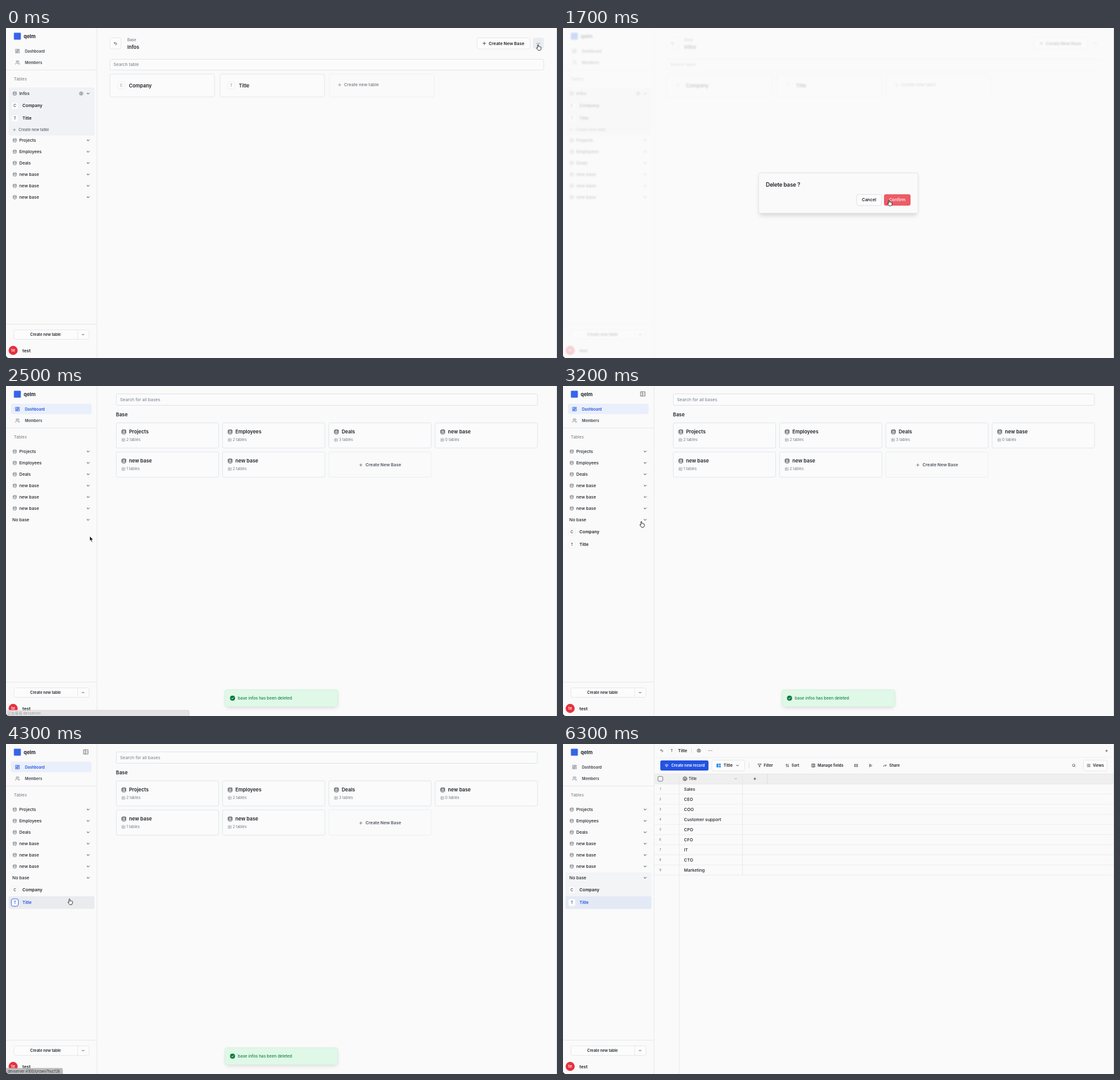
Recreate the animation shown at these times as an HTML page. Size 872 px wide and 522 px high, loop 6400 ms.

```html
<!DOCTYPE html>
<html lang="en">
<head>
<meta charset="utf-8">
<title>Deleting a base</title>
<style>
  html, body { margin: 0; width: 100%; height: 100%; overflow: hidden; background: #fafafa; }
  svg { display: block; width: 872px; height: 522px; font-family: Inter, "Noto Sans CJK SC", "Noto Sans CJK", sans-serif; }
  text { white-space: pre; }
</style>
</head>
<body>
<svg id="stage" viewBox="0 0 872 522"></svg>
<script>
const LOOP = 6400, STEP = 100;
const INK = '#20232a', MUTED = '#737984', PALE = '#a0a5ad', LINE = '#e3e5e8', BLUE = '#2452e0', RED = '#e5404b';
const SMALL = 5.95, BODY = 6.8, TITLE = 7.8;
const BRAND = 'qelm', HOST = 'devserver';

// Icon outlines on a 24 unit grid
const ICONS = {
  base: 'M3 5a9 3 0 0 1 18 0a9 3 0 0 1-18 0V19a9 3 0 0 0 18 0V5M3 12a9 3 0 0 0 18 0',
  down: 'M6 9l6 6 6-6',
  plus: 'M4 12h16M12 4v16',
  users: 'M16 21v-2a4 4 0 0 0-4-4H6a4 4 0 0 0-4 4v2M13 7a4 4 0 1 1-8 0 4 4 0 0 1 8 0M22 21v-2a4 4 0 0 0-3-3.9M16 3.1a4 4 0 0 1 0 7.8',
  dashboard: 'M3 3h7v9H3zM14 3h7v5h-7zM14 12h7v9h-7zM3 16h7v5H3z',
  back: 'M9 14L4 9l5-5M4 9h10.5a5.5 5.5 0 0 1 0 11H12',
  dots: 'M4 12h.1M12 12h.1M20 12h.1',
  gear: 'M12 3l3 2 4 0 1 4 2 3-2 3-1 4-4 0-3 2-3-2-4 0-1-4-2-3 2-3 1-4 4 0zM15 12a3 3 0 1 1-6 0 3 3 0 0 1 6 0',
  trash: 'M3 6h18M19 6v15H5V6M8 6V2h8v4M10 11v6M14 11v6',
  file: 'M5 10V2h9l6 6v14h-8M14 2v6h6M2 17h8M7 14l3 3-3 3',
  filter: 'M22 3H2l8 9.5V19l4 2v-8.5z',
  sort: 'M21 16l-4 4-4-4M17 20V4M3 8l4-4 4 4M7 4v16',
  columns: 'M3 3h18v18H3zM9 3v18M15 3v18',
  rows: 'M3 5h5v4H3zM3 15h5v4H3zM13 5h8M13 9h8M13 15h8M13 19h8',
  play: 'M5 3v18M10 7h5l5 5-5 5h-5z',
  share: 'M15 17l5-5-5-5M4 18v-2a4 4 0 0 1 4-4h12',
  search: 'M19 11a8 8 0 1 1-16 0 8 8 0 0 1 16 0M21 21l-4.3-4.3',
  menu: 'M3 5h18M3 12h18M3 19h18',
  panel: 'M3 3h18v18H3zM9 3v18M16 9l-3 3 3 3',
  table: 'M3 3h18v18H3zM3 9h18M9 3v18M3 15h18',
  record: 'M2 9q10-9 20 0M6 13q6-5 12 0M10 17l2 3 2-3z',
  type: 'M22 12a10 10 0 1 1-20 0 10 10 0 0 1 20 0M12 6v12M8 12l4 5 4-5'
};

const clamp = v => Math.max(0, Math.min(1, v));
const ramp = (t, from, to) => clamp((t - from) / (to - from));
const during = (t, from, to) => t >= from && t < to;

const text = (x, y, s, size = BODY, weight = 500, fill = INK, extra = '') =>
  `<text x="${x}" y="${y + size * .36}" font-size="${size}" font-weight="${weight}" fill="${fill}" ${extra}>${s}</text>`;
const centred = (x, y, s, size, weight, fill) => text(x, y, s, size, weight, fill, 'text-anchor="middle"');
const rect = (x, y, w, h, fill, stroke = 'none', r = 0, extra = '') =>
  `<rect x="${x}" y="${y}" width="${w}" height="${h}" rx="${r}" fill="${fill}" stroke="${stroke}" stroke-width=".8" ${extra}/>`;
const icon = (name, x, y, size = 7, color = INK, width = 2.4) =>
  `<path d="${ICONS[name]}" transform="translate(${x - size / 2} ${y - size / 2}) scale(${size / 24})"
    fill="none" stroke="${color}" stroke-width="${width}" stroke-linecap="round" stroke-linejoin="round"/>`;
const hLine = (x1, x2, y, c = LINE) => rect(x1, y, x2 - x1, .8, c);
const vLine = (x, y1, y2, c = LINE) => rect(x, y1, .8, y2 - y1, c);
const shadow = (x, y, w, h, r = 4) => rect(x, y, w, h, '#00000022', 'none', r, 'style="filter:blur(3px)"');
const group = (body, style = '') => `<g style="${style}">${body}</g>`;

const badge = (x, y, letter, color = '#4b505a', stroke = '#eceef0') =>
  rect(x - 5.6, y - 5.8, 11.2, 11.6, '#fcfcfc', stroke, 3) + centred(x, y, letter, 5.6, 600, color);

const baseRow = (name, y) =>
  icon('base', 13.8, y, 6.6, '#5d626b') + text(21, y, name) + icon('down', 130, y, 7, INK, 3);

function tableRow(name, y, { hover = false, active = false } = {}) {
  const lit = hover || active;
  const fill = active ? '#e3e9f5' : '#e9ebef';
  return (lit ? rect(4, y - 10, 136, 20, fill, 'none', 2) : '') +
    badge(14, y, name[0], lit ? BLUE : undefined, hover ? BLUE : undefined) +
    text(26, y, name, BODY, 600, lit ? BLUE : INK);
}

function sidebar(t) {
  const home = during(t, 2200, 4500), inTable = t >= 4500, deleted = t >= 2200;
  const nav = home ? BLUE : '#3c414a';
  let s = rect(0, 0, 144, 522, '#fafafa') + vLine(143.6, 0, 522);
  s += rect(12.5, 7.5, 11, 11, '#3564ea', 'none', 1) + text(28, 13, BRAND, TITLE, 700);
  if (during(t, 2600, 5300)) s += icon('panel', 126.5, 12.5, 9, '#555a63', 2);
  if (home) s += rect(8, 28, 127.5, 16.5, '#e9effb', 'none', 2.5);
  s += icon('dashboard', 18.3, 36.5, 7.6, home ? BLUE : '#7c818a') + text(30, 36.5, 'Dashboard', SMALL, 600, nav);
  s += icon('users', 18.3, 54.5, 7.6, '#7c818a') + text(30, 54.5, 'Members', SMALL, 600, '#3c414a');
  s += hLine(0, 144, 66.2) + text(12.5, 81, 'Tables', 6.6, 400, MUTED);

  let y = 103.7;
  if (!deleted) {
    s += rect(4, 94, 136, 76, '#f0f2f5', 'none', 3) + baseRow('Infos', y) + icon('gear', 119, y, 7, '#555a63');
    s += tableRow('Company', 123) + tableRow('Title', 143);
    s += icon('plus', 13.3, 161, 5.2, MUTED, 3) + text(20, 161, 'Create new table', SMALL, 500, '#5b616c');
    y = 177.7;
  }
  for (const name of ['Projects', 'Employees', 'Deals', 'new base', 'new base', 'new base']) {
    s += baseRow(name, y);
    y += 18;
  }
  if (deleted) {
    if (inTable) s += rect(4, 203, 136, 58, '#f2f4f6', 'none', 3);
    s += text(10, 211.7, 'No base') + icon('down', 130, 211.7, 7, INK, 3);
    s += group(tableRow('Company', 230.8, { hover: during(t, 3600, 4250) }) +
      tableRow('Title', 250.8, { hover: during(t, 4250, 5200), active: inTable }), `opacity:${ramp(t, 2900, 3100)}`);
  }

  s += hLine(0, 144, 468.2);
  s += rect(12.5, 477.5, 119, 15, '#fcfcfc', LINE, 3) + vLine(113, 477.5, 492.5);
  s += centred(62.5, 485, 'Create new table', SMALL, 600) + icon('down', 122, 485, 6, INK, 3);
  s += `<circle cx="11.3" cy="510" r="7.2" fill="#e5323e"/>` + centred(11.3, 510, 'te', 6.6, 500, '#fff');
  return s + text(26, 510, 'test', 7, 600);
}

function basePage(t) {
  let s = rect(164.5, 15.5, 17.5, 17.5, '#fcfcfc', LINE, 3) + icon('back', 173.2, 24.5, 6);
  s += text(192, 19.3, 'Base', SMALL, 500, MUTED) + text(192, 30.5, 'Infos', TITLE, 600);
  s += rect(745.5, 15.5, 84, 17.5, '#fcfcfc', LINE, 3) + icon('plus', 757, 24.3, 6.6, INK, 2.6) +
    text(764, 24.3, 'Create New Base', BODY, 600);
  if (t < 200) s += rect(834, 15.5, 17, 17.5, '#e9ecf0', 'none', 3);
  s += icon('dots', 842.4, 24.3, 7, INK, 3);
  s += rect(164.5, 49.5, 686.5, 17, '#fbfbfb', '#dee3e8', 2) + text(170, 58, 'Search table', BODY, 400, MUTED);
  ['Company', 'Title'].forEach((name, i) => {
    const x = 164.5 + i * 174;
    s += rect(x, 72.8, 165.5, 36.2, '#fbfbfb', '#dfe3e8', 2.5) + badge(x + 18, 91, name[0], PALE) +
      text(x + 30, 91, name, TITLE, 600);
  });
  return s + rect(512, 72.8, 165.5, 36.2, '#fafafa', '#eceef0', 2.5) + icon('plus', 528, 90, 6, MUTED, 2.6) +
    text(535, 90, 'Create new table', BODY, 500, MUTED);
}

function menu(opacity) {
  return group(shadow(757, 40, 109, 31) + rect(756, 37, 111, 32, '#fdfdfd', '#e8e9eb', 3) +
    icon('file', 765.3, 45.5, 6) + text(772, 45.5, 'Export base as template', SMALL, 500) +
    icon('trash', 765.3, 59.5, 5.8, RED) + text(772, 59.5, 'Delete base', SMALL, 500, RED), `opacity:${opacity}`);
}

function dialog(shown) {
  const body = shadow(311, 233, 249, 64) + rect(309.5, 229.3, 252.5, 63.7, '#fafafa', '#dfe1e4', 3) +
    text(321, 248.3, 'Delete base ?', 8.8, 600, INK, 'letter-spacing="-.22"') +
    rect(464.8, 263.3, 39.4, 17.5, '#fcfcfc', '#dcdee1', 3) + centred(484.3, 272, 'Cancel', BODY, 600) +
    rect(508, 263, 42, 18, '#ec5c66', 'none', 3) + centred(529, 272, 'Confirm', BODY, 500, '#fff');
  return group(body, `opacity:${shown};transform-origin:436px 261px;
    transform:translateY(${-3.5 * (1 - shown)}px) scale(${.96 + .04 * shown})`);
}

function dashboardPage() {
  let s = rect(174.5, 12.5, 666.5, 18, '#fbfbfb', '#d8e0ea', 2) + text(180.5, 21.7, 'Search for all bases', BODY, 400, MUTED);
  s += text(174, 44.7, 'Base', TITLE, 600);
  const bases = [['Projects', 2], ['Employees', 2], ['Deals', 3], ['new base', 0], ['new base', 1], ['new base', 2]];
  bases.forEach(([name, count], i) => {
    const x = 174.5 + (i % 4) * 168.2, y = 58.3 + Math.floor(i / 4) * 46;
    s += rect(x, y, 162, 39.8, '#fbfbfb', '#dae2eb', 2.5) + icon('base', x + 12, y + 14.2, 8) +
      text(x + 20.3, y + 14.2, name, TITLE, 600) + icon('table', x + 11.5, y + 27, 5.8, PALE) +
      text(x + 16, y + 27, count + ' tables', SMALL, 400, MUTED);
  });
  return s + rect(511, 104.3, 162, 40, '#fafafa', '#eaecef', 2.5) + icon('plus', 561.5, 125, 6, '#4f555f', 2.6) +
    text(569, 125, 'Create New Base', BODY, 600, '#4f555f');
}

function tablePage() {
  let s = icon('back', 156.2, 10.5, 5.6) + badge(172, 10.5, 'T') + text(182, 10.5, 'Title', BODY, 600) +
    vLine(203, 7, 14, '#d5d7da') + icon('gear', 215, 10.5, 7) + icon('dots', 233, 10.5, 7, INK, 3) +
    icon('plus', 860.2, 10.8, 4.8, INK, 3) + hLine(144, 872, 20.8, '#eceef0');
  s += rect(154, 26, 76.3, 16, BLUE, 'none', 2.5) + icon('record', 164, 34, 6.6, '#fff') +
    text(171.5, 34, 'Create new record', SMALL, 600, '#fff');
  s += rect(235.5, 25.5, 52, 17, '#fcfcfc', LINE, 3) +
    rect(243, 31, 2.8, 6, '#2b8df0') + rect(246.5, 31, 3.2, 2.6, '#2b8df0') + rect(246.5, 34.4, 3.2, 2.6, '#2b8df0') +
    text(254, 34, 'Title', BODY, 600) + icon('down', 276, 34, 7, INK, 2.6) + vLine(294, 30, 38, '#d5d7da');
  const tools = [['filter', 311, 'Filter'], ['sort', 355, 'Sort'], ['columns', 396.3, 'Manage fields'],
    ['rows', 464, ''], ['play', 487, ''], ['share', 509.5, 'Share']];
  for (const [name, x, label] of tools) s += icon(name, x, 34, 6.2) + text(x + 6.8, 34, label, SMALL, 600);
  s += icon('search', 808.3, 34, 5.8) + rect(823.5, 25.5, 37.5, 17, '#fcfcfc', LINE, 3) +
    icon('menu', 832, 34, 6.2) + text(838.5, 34, 'Views', SMALL, 600);

  s += rect(144, 47, 728, 16, '#efefef') + hLine(144, 872, 47, '#e6e7e9') + hLine(144, 872, 62.8) + vLine(323, 47, 63, '#d9dbde');
  s += rect(150.3, 51.3, 7.6, 7.6, '#f6f6f6', '#5d626b', 1.5) + icon('type', 193, 55, 7.4) +
    text(199, 55, 'Title', SMALL, 500) + icon('down', 273.3, 55, 5.5, MUTED, 2.6) + icon('plus', 303.6, 55, 5.4, INK, 3);
  const titles = ['Sales', 'CEO', 'COO', 'Customer support', 'CPO', 'CFO', 'IT', 'CTO', 'Marketing'];
  titles.forEach((name, i) => {
    const y = 71.2 + i * 16;
    s += centred(154, y, i + 1, 5.4, 400, MUTED) + text(191.5, y, name) + hLine(144, 872, y + 7.6, '#e9ebed');
  });
  return s + vLine(183.5, 47, 522, '#e6e8ea') + vLine(283.5, 47, 207);
}

function toast(t) {
  const shown = Math.min(ramp(t, 2250, 2450), 1 - ramp(t, 6000, 6200));
  const body = shadow(348, 484, 176, 25) + rect(346.4, 480.4, 179, 26.8, '#e0f8e8', '#d0f2dc', 3.5) +
    `<circle cx="358.5" cy="493.7" r="4" fill="#087a36"/>` +
    `<path d="M356.7 493.8l1.3 1.3 2.4-2.6" fill="none" stroke="#e0f8e8" stroke-width=".9"/>` +
    text(367, 493.7, 'base infos has been deleted', 6.4, 500, '#14853d');
  return shown ? group(body, `opacity:${shown};transform:translateY(${30 * (1 - shown)}px)`) : '';
}

function status(t) {
  if (during(t, 2200, 2800))
    return rect(-3, 513, 293, 12, '#e3e3e3', '#d5d5d5', 2) + text(2.5, 518, `正在等待 ${HOST}...`, 5.8, 400, '#9a9a9a');
  if (!during(t, 3600, 5300)) return '';
  const path = t < 4250 ? 'rowmkzpd3y5' : 'rowv7hucf26';
  return rect(-3, 513, 92.5, 12, '#bdbdbd', '#b0b0b0', 2) + text(2.5, 518, `${HOST}:4100/t/${path}`, 5.7, 400, '#33363b');
}

// Pointer tip: time, x, y
const PATH = [[0, 842, 26], [200, 842, 26], [550, 823, 61.5], [800, 823, 61.5], [1500, 516, 272], [2050, 516, 272],
  [2500, 132.5, 237.5], [2850, 129, 211], [3050, 129, 211], [3700, 92, 234], [4100, 92, 234], [4400, 103.5, 248.5],
  [5100, 103.5, 248.5], [5500, 697, 9], [5700, 714, -14], [LOOP, 714, -14]];

function pointer(t) {
  const next = PATH.findIndex(p => p[0] > t), [t0, x0, y0] = PATH[next - 1], [t1, x1, y1] = PATH[next];
  const p = ramp(t, t0, t1), k = p * p * (3 - 2 * p);
  const hand = t < 300 || during(t, 1450, 2100) || during(t, 2850, 5150);
  const shape = hand
    ? `<path d="M-.8 .8q.8-1.2 1.6 0v2.7q.8-.7 1.5 .1q.8-.5 1.3 .3q1-.3 1.1 .8v2q-.2 1.7-1.2 2.6h-3.2q-1.3-1.4-2.7-3.5q-.1-1.2 1.6-.2z" fill="#fff" stroke="#111" stroke-width=".8"/>`
    : `<path d="M0 0v7.6l1.7-1.5 1.3 2.9 1.4-.6-1.3-2.8h2.4z" fill="#111" stroke="#fff" stroke-width=".6"/>`;
  return `<g transform="translate(${x0 + (x1 - x0) * k} ${y0 + (y1 - y0) * k})">${shape}</g>`;
}

function scene(t) {
  const veil = Math.min(ramp(t, 700, 900), 1 - ramp(t, 2050, 2200));
  const shown = Math.min(ramp(t, 650, 800), 1 - ramp(t, 2050, 2200));
  const menuShown = Math.min(ramp(t, 150, 300), 1 - ramp(t, 700, 850));
  const page = t < 2200 ? basePage(t) : t < 4500 ? dashboardPage() : tablePage();
  const blur = veil ? `filter:blur(${1.2 * veil}px);opacity:${1 - .78 * veil}` : '';
  return rect(0, 0, 872, 522, '#fafafa') + group(sidebar(t) + page, blur) +
    (menuShown > 0 ? menu(menuShown) : '') + (shown > 0 ? dialog(shown) : '') + toast(t) + status(t) +
    vLine(871, 0, 522, '#d4d5d7') + `<path d="M0 522v-4q.5 3.5 4 4z" fill="#111"/>` + pointer(t);
}

const stage = document.getElementById('stage');
const start = performance.now();
let drawn = -1;
function tick() {
  const t = Math.floor((performance.now() - start) % LOOP / STEP) * STEP;
  if (t !== drawn) stage.innerHTML = scene(drawn = t);
  requestAnimationFrame(tick);
}
tick();
</script>
</body>
</html>
```
